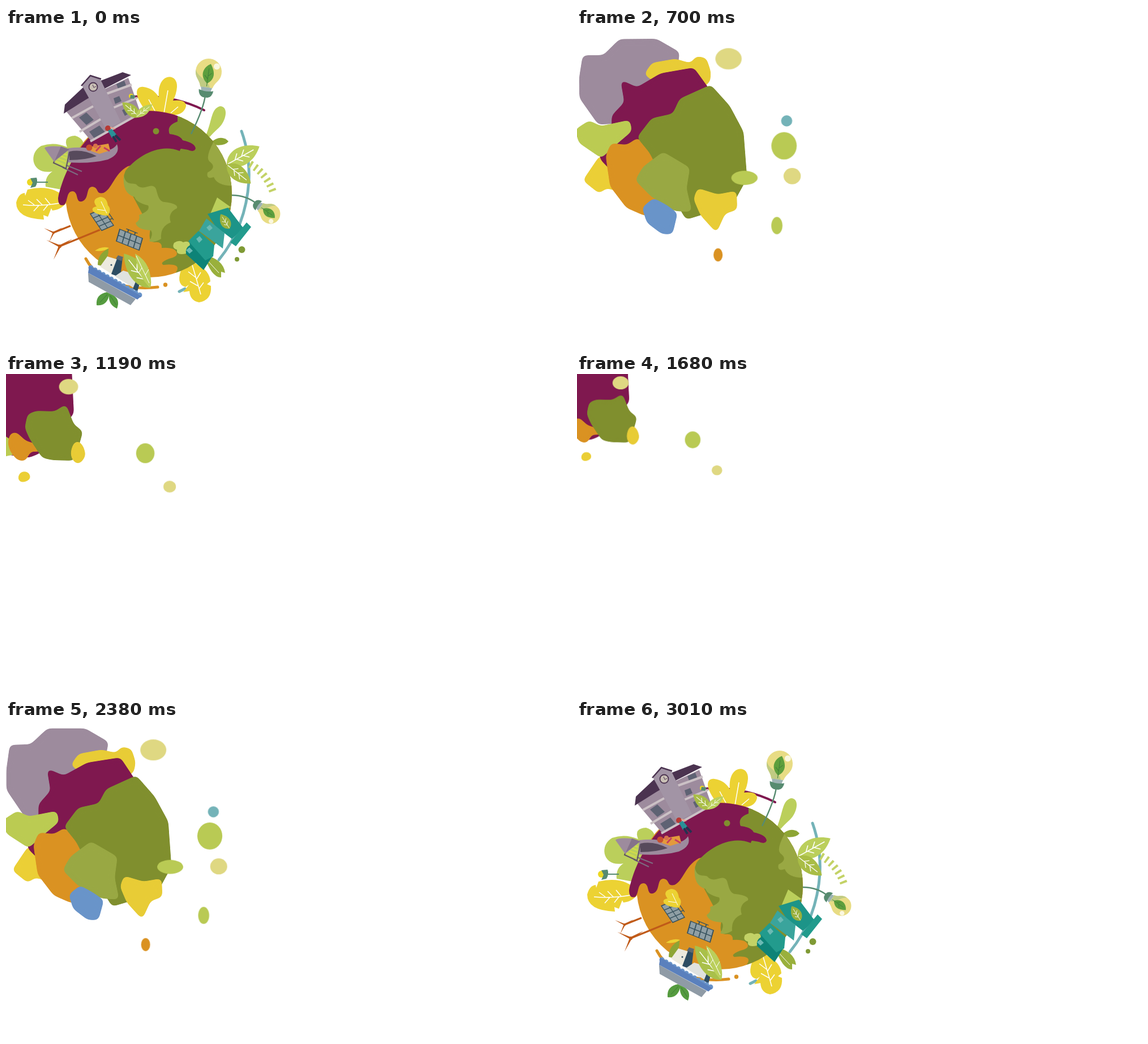
An HTML page without scripts that plays this animation: 998x561 px, repeating every 3.08 s.

```html
<!DOCTYPE html>
<html lang="en">
<head>
<meta charset="utf-8">
<title>Green globe</title>
<style>
html, body { margin: 0; width: 100%; height: 100%; overflow: hidden; background: #fff; }
svg { display: block; width: 998px; height: 561px; }
svg * { animation-duration: 3.08s; animation-iteration-count: infinite; animation-timing-function: step-end; }

/* Large blobs flow between two outlines; drops slide to the corner by the factor --k */
.blob { d: var(--near); filter: url(#goo); animation-name: flow; }
.drop { animation-name: slide; }
.brief { animation-name: brief; }
.late { animation-name: late; }
#blobs { animation-name: blobs; }
#art { animation-name: early, shift; }

@keyframes flow {
  0% { d: var(--near); transform: scale(1.1); animation-timing-function: steps(7); }
  15.909% { d: var(--near); transform: none; animation-timing-function: steps(10); }
  38.636% { d: var(--far); transform: none; animation-timing-function: steps(5); }
  50% { d: var(--far); transform: scale(.8) translate(-20px, -20px); animation-timing-function: steps(6); }
  63.636% { d: var(--far); transform: none; animation-timing-function: steps(9); }
  84.09% { d: var(--near); transform: none; animation-timing-function: steps(6); }
  97.727%, 100% { d: var(--near); transform: scale(1.1); }
}
@keyframes slide {
  0% { transform: translate(calc(var(--x) * 1.1), calc(var(--y) * 1.1)); animation-timing-function: steps(7); }
  15.909% { transform: translate(var(--x), var(--y)); animation-timing-function: steps(10); }
  38.636% { transform: translate(calc(var(--x) * var(--k)), calc(var(--y) * var(--k))) scale(.65); animation-timing-function: steps(5); }
  50% { transform: translate(calc(var(--x) * (var(--k) - .15)), calc(var(--y) * (var(--k) - .15))) scale(.5); animation-timing-function: steps(6); }
  63.636% { transform: translate(calc(var(--x) * var(--k)), calc(var(--y) * var(--k))) scale(.65); animation-timing-function: steps(9); }
  84.09% { transform: translate(var(--x), var(--y)); animation-timing-function: steps(6); }
  97.727%, 100% { transform: translate(calc(var(--x) * 1.1), calc(var(--y) * 1.1)); }
}
@keyframes blobs { 0%, 97.727%, 100% { opacity: 0; } 2.272% { opacity: 1; } }
@keyframes early { 0%, 95.454%, 100% { opacity: 1; } 6.818% { opacity: 0; } }
@keyframes late { 0%, 84.09%, 100% { opacity: 1; } 18.181% { opacity: 0; } }
@keyframes brief { 0%, 68.181%, 100% { opacity: 1; } 31.818% { opacity: 0; } }
@keyframes shift {
  0% { transform: none; animation-timing-function: steps(3); }
  6.818%, 93.181% { transform: scale(.97); animation-timing-function: steps(2); }
  97.727%, 100% { transform: none; }
}

.mauve {
  --near: path("M31 100 40 86 75 94 90 62 145 57 182 78 200 120 128 194 75 162 36 125");
  --far: path("M-60 60 -60 -40 -20 -60 40 -80 130 -70 180 -40 120 -5 0 105 -50 190 -70 120");
}
.plume {
  --near: path("M6 305 45 250 72 248 92 335 60 322 45 335");
  --far: path("M20 185 25 172 40 172 45 185 35 190 25 192");
}
.crown {
  --near: path("M158 100 170 78 218 71 256 99 268 74 290 72 304 102 320 122 317 142 185 125");
  --far: path("M26 40 44 23 71 15 71 -24 77 -8 85 9 79 19 38 32 -28 40 35 33");
}
.purple {
  --near: path("M82 310 58 270 64 244 96 232 96 208 128 187 118 143 143 162 185 123 245 104 287 130 200 240");
  --far: path("M40 148 0 142 -20 100 -20 60 -20 30 -20 0 -20 -30 20 -30 60 -20 116 -10 120 70 60 140");
}
.bush {
  --near: path("M21 200 35 188 60 200 125 178 128 200 95 235 70 264 30 225");
  --far: path("M-60 130 -10 105 0 110 20 125 25 140 0 145 -20 150 -60 150");
}
.orange {
  --near: path("M71 270 83 245 118 251 138 226 172 262 232 392 205 412 155 407 116 388 80 340");
  --far: path("M3 122 7 105 18 102 35 118 63 126 62 138 44 136 34 154 20 152 8 138");
}
.green {
  --near: path("M137 235 172 197 219 188 222 150 292 120 334 158 362 218 374 325 340 382 240 418 195 330 165 265");
  --far: path("M33 95 38 71 53 65 86 66 106 53 120 89 136 101 129 126 120 153 82 152 64 148 42 115");
}
.land {
  --near: path("M126 300 143 279 170 256 223 292 207 325 235 393 212 397 165 345");
  --far: path("M48 195 55 165 110 130 145 140 162 185 130 165 80 150 50 185");
}
.tuft {
  --near: path("M245 372 253 351 300 369 344 355 344 397 316 402 298 448 262 408");
  --far: path("M114 138 119 122 128 117 137 128 141 143 135 154 126 160 116 150");
}
.blue {
  --near: path("M152 395 175 373 205 387 220 405 217 463 200 461 165 435");
  --far: path("M28 134 42 129 50 138 79 143 56 133 33 136 26 130");
}
</style>
</head>
<body>
<svg viewBox="0 0 998 561">
<defs>
  <filter id="goo" x="-.3" y="-.3" width="1.6" height="1.6" color-interpolation-filters="sRGB">
    <feGaussianBlur stdDeviation="5"/>
    <feColorMatrix values="1 0 0 0 0 0 1 0 0 0 0 0 1 0 0 0 0 0 14 -6.5"/>
  </filter>
  <clipPath id="disc"><circle cx="252" cy="293" r="147"/></clipPath>
  <g id="leaf">
    <path d="M0 0C15-30 60-36 100 0C65 32 20 32 0 0"/>
    <path d="M4 0H82M25 0l13-13M45 0l14-13M30 0l13 13M50 0l13 12" fill="none" stroke="#fff" stroke-width="2.4"/>
  </g>
  <g id="bulb">
    <path d="M-23 0a23 23 0 0 1 46 0C23 14 13 17 11 28H-11C-13 17-23 14-23 0" fill="#e8dc84"/>
    <path d="M-23 0C-23 14-13 17-11 28H6C2 14-16 14-23 0" fill="#c0cb83"/>
    <circle cx="13" cy="-11" r="5.5" fill="#faf7df"/>
    <path d="M0 21C-17 8-9-8 2-14C12 0 13 12 0 21" fill="#5d9f3d"/>
    <path d="M0 26V-6M0 8l6-6M0 13l-6-6" stroke="#3f7f3a" fill="none"/>
    <path d="M-10 28H10L8 36H-8z" fill="#9db3b4"/>
    <path d="M-13 33Q0 37 13 33Q12 44 4 46H-4Q-12 44-13 33" fill="#578b70"/>
  </g>
  <g id="panel" stroke="#38535f" stroke-width="1.8">
    <path d="M14 0V-7M26 0V-7M10-7H30"/>
    <path d="M0 0H40V30H0z" fill="#8f9fa5"/>
    <path d="M10 0V30M20 0V30M30 0V30M0 15H40"/>
  </g>
  <path id="blade" d="M-2 0L0-26L2 0z"/>
  <g id="mill" fill="#c05a18">
    <circle r="3"/>
    <use href="#blade" transform="rotate(60)"/>
    <use href="#blade" transform="rotate(-65)"/>
    <use href="#blade" transform="rotate(205)"/>
  </g>
</defs>

<g id="blobs">
  <path class="blob mauve" fill="#9d8b9d"/>
  <path class="blob plume" fill="#ebcf36"/>
  <g class="brief"><path class="blob crown" fill="#e8cc36"/></g>
  <path class="blob purple" fill="#7f184f"/>
  <path class="blob bush" fill="#bbcb52"/>
  <path class="blob orange" fill="#da9222"/>
  <path class="blob green" fill="#808f2e"/>
  <g class="brief"><path class="blob land" fill="#99a843"/></g>
  <g class="late">
    <ellipse class="drop" rx="32" ry="22" fill="#9bae3a" style="--x:374px;--y:241px;--k:.6"/>
    <ellipse class="drop" rx="25" ry="26" fill="#229b8d" style="--x:349px;--y:343px;--k:.5"/>
    <ellipse class="drop" rx="6" ry="10" fill="#74b3b8" style="--x:291px;--y:446px;--k:.7"/>
  </g>
  <path class="blob tuft" fill="#e8cc36"/>
  <path class="blob blue" fill="#6994c9"/>
  <g class="brief">
    <ellipse class="drop" rx="11" ry="11" fill="#74b3b8" style="--x:407px;--y:180px;--k:.7"/>
    <ellipse class="drop" rx="26" ry="14" fill="#b9ca54" style="--x:348px;--y:311px;--k:.5"/>
    <ellipse class="drop" rx="11" ry="17" fill="#b9ca54" style="--x:388px;--y:383px;--k:.7"/>
    <ellipse class="drop" rx="9" ry="13" fill="#da9222" style="--x:272px;--y:437px;--k:.72"/>
  </g>
  <ellipse class="drop" rx="25" ry="27" fill="#b9ca54" style="--x:417px;--y:237px;--k:.59"/>
  <ellipse class="drop" rx="26" ry="21" fill="#dfd882" style="--x:335px;--y:68px;--k:.33"/>
  <ellipse class="drop" rx="17" ry="16" fill="#dfd882" style="--x:419px;--y:288px;--k:.69"/>
</g>

<g id="art">
  <g fill="none" stroke-width="5" stroke-linecap="round">
    <path d="M416 182Q431 224 429 270Q424 350 376 409M306 465L316 460" stroke="#74b3b8"/>
    <path d="M222 121Q295 117 350 145" stroke="#7f184f" stroke-width="4"/>
    <path d="M141 407Q152 428 172 440M205 454Q238 461 268 457" stroke="#da9222"/>
  </g>

  <!-- plants behind the globe -->
  <path d="M70 280Q68 262 82 253C46 260 38 222 62 208Q85 200 108 210Q100 191 122 190Q140 195 138 215L115 255L98 285z" fill="#bbcf5b"/>
  <path d="M18 308Q22 292 33 291L34 296L38 285Q84 274 110 304Q100 320 82 322L80 318L74 333L66 330L67 338Q18 336 18 308" fill="#ecd233"/>
  <path d="M30 312Q65 315 100 308M50 312l-11-8M64 312l-10-10M78 311l-9-11M58 313l-9 10M74 312l-8 10" fill="none" stroke="#fff" stroke-width="1.5"/>
  <path d="M48 272H74" stroke="#578b70" stroke-width="2"/>
  <circle cx="43" cy="272" r="6" fill="#ecd822"/>
  <path d="M43 265L54 264Q57 272 52 280L43 282L47 273z" fill="#578b70"/>
  <path d="M250 150C222 116 230 102 243 104Q260 106 270 122C266 78 304 78 302 104Q301 117 295 128Q318 125 318 138Q314 154 292 154z" fill="#ecd233"/>
  <path d="M279 150L286 110M264 148L252 126M291 150L304 139" stroke="#fff" stroke-width="1.5"/>
  <path d="M353 190C365 160 362 143 378 138C394 138 389 164 376 176Q366 185 360 192z" fill="#bbcf5b"/>
  <path d="M360 203Q380 186 393 200Q386 210 360 205" fill="#8da534"/>
  <path d="M312 420Q298 452 317 457L323 453L313 466L324 464Q325 481 341 484Q364 480 362 455L355 452L361 447Q360 428 335 415z" fill="#ecd233"/>
  <path d="M328 415Q337 445 344 470M335 440l-13-10M339 455l-14-8M336 444l8-13M341 460l8-11" fill="none" stroke="#fff" stroke-width="1.5"/>
  <path d="M350 400Q384 408 387 432L380 430L380 440Q362 440 350 400" fill="#99b03c"/>
  <path d="M354 408L376 432" stroke="#fff"/>
  <path d="M431 240Q460 256 472 290" fill="none" stroke="#c3d266" stroke-width="13" stroke-dasharray="4 6"/>

  <!-- globe -->
  <circle cx="252" cy="293" r="147" fill="#da9222"/>
  <path d="M303 155C270 143 230 144 205 152C145 176 105 240 92 300Q92 316 103 312C110 305 106 288 118 288C129 290 122 308 134 306C148 302 140 280 153 280C165 282 158 294 172 291C188 284 190 258 215 244L270 230L335 214z" fill="#7f184f"/>
  <g clip-path="url(#disc)">
    <path d="M303 140V165Q283 172 289 187Q308 189 312 198Q334 203 335 212Q333 220 322 215Q308 208 307 217C270 202 230 228 211 252Q202 272 218 285L255 355Q250 378 262 378Q276 376 275 388Q300 386 302 398Q302 404 288 407Q270 414 278 418Q314 414 298 434L285 445H420V140z" fill="#808f2e"/>
    <path d="M303 155V167Q285 172 289 187Q308 189 312 198Q334 203 335 212Q333 220 322 215L280 208V150z" fill="#7f184f"/>
    <path d="M303 140V165Q283 172 289 187Q308 189 312 198Q334 203 335 212L380 200V140z" fill="#808f2e"/>
    <path d="M208 260C212 282 228 270 232 278C245 288 255 272 264 282C268 290 268 306 280 307Q305 310 302 318Q285 326 291 343Q272 350 274 372Q260 380 253 376Q261 364 256 357Q232 356 229 344Q238 338 235 330Q256 322 251 313Q230 308 227 298Q205 292 208 260" fill="#99a843"/>
    <path d="M367 200Q352 228 359 235Q374 246 356 255Q353 268 367 263Q374 280 405 278V200z" fill="#99a843"/>
  </g>
  <circle cx="265" cy="182" r="5.5" fill="#808f2e"/>

  <!-- school -->
  <path d="M107 148L140 124L216 88L237 148L151 200z" fill="#9d8b9d"/>
  <path d="M102 151L104 135L136 105L206 78L221 83L176 106L140 127z" fill="#4b3350"/>
  <path d="M129 158l13-9 13 13-13 9zM147 183l18-11 10 12-18 12zM195 99l14-6 4 11-14 6zM190 124l10-4 4 9-11 5zM205 145l15-8 4 10-14 8z" fill="#5e6273"/>
  <path d="M116 159L154 138M130 183L172 158M172 118L222 100M184 143L232 123M149 200L238 150" stroke="#cbc1c5" stroke-width="4"/>
  <path d="M134 101L150 83L167 91L203 166L177 179z" fill="#a294a5"/>
  <path d="M133 102L149 84L168 90" fill="none" stroke="#4b3350" stroke-width="2.5"/>
  <circle cx="154" cy="104" r="7.5" fill="#c9c0b5" stroke="#4b3350" stroke-width="1.8"/>
  <path d="M153 100l2 5 4-2" fill="none" stroke="#4b3350"/>
  <circle cx="221" cy="120" r="4" fill="#ecd822"/>
  <path d="M220 118l9 1-3 6-7-1z" fill="#578b70"/>
  <use href="#leaf" fill="#a9bd46" transform="translate(236 157) rotate(220) scale(.4)"/>
  <use href="#leaf" fill="#bbcf5b" transform="translate(230 157) rotate(-38) scale(.36 .3)"/>

  <!-- playground -->
  <path d="M110 212Q140 208 160 216Q188 219 196 205Q203 222 180 232Q150 240 108 237z" fill="#9d8b9d"/>
  <path d="M112 218Q135 213 160 226Q140 233 112 233z" fill="#574a5c"/>
  <path d="M106 242L134 253M100 246L127 259" stroke="#7c6b80" stroke-width="2"/>
  <circle cx="180" cy="177" r="5" fill="#b73a35"/>
  <path d="M180 181L187 178L196 189L187 194z" fill="#2a9097"/>
  <path d="M189 191L195 201M193 189L202 198" stroke="#243250" stroke-width="4"/>
  <path d="M184 175L193 178" stroke="#e4a28a" stroke-width="2"/>
  <path d="M152 209L181 204L184 216L165 222L150 217z" fill="#e39a3c"/>
  <circle cx="147" cy="211" r="5.5" fill="#c8502f"/>
  <circle cx="158" cy="208" r="4" fill="#d8714c"/>
  <path d="M159 217l8-9M173 211l10 6" stroke="#c63d62" stroke-width="3"/>

  <!-- energy -->
  <use href="#panel" transform="matrix(.5 .73 -.7 .3 170 319)"/>
  <use href="#panel" transform="matrix(1 .4 -.2 .7 201 355)"/>
  <path d="M180 331C150 330 147 316 160 315Q150 302 166 298Q178 298 180 313Q187 320 180 331" fill="#ecd233"/>
  <path d="M178 327L168 306M175 322l-14-2" stroke="#fff"/>
  <path d="M327 187Q350 140 352 118M399 295Q425 295 444 311" fill="none" stroke="#578b70" stroke-width="2.5"/>
  <use href="#bulb" transform="translate(358 77) rotate(8)"/>
  <use href="#bulb" transform="translate(467 328) rotate(125) scale(.76)"/>
  <use href="#leaf" fill="#bbcf5b" transform="translate(390 241) rotate(-29) scale(.66)"/>
  <use href="#leaf" fill="#a9bd46" transform="translate(390 241) rotate(38) scale(.54)"/>

  <!-- factory -->
  <path d="M360 330L373 299L397 316z" fill="#bbcf5b"/>
  <path d="M315 396L327 376L355 398L365 402L349 427z" fill="#0d8377"/>
  <path d="M356 328L392 317L420 354L399 372L370 350z" fill="#1c9488"/>
  <path d="M322 376L340 358L368 383L366 403L352 410z" fill="#229b8d"/>
  <path d="M341 358L354 336L386 362L383 389z" fill="#3aa49c"/>
  <path d="M396 378L425 343L433 351L406 385z" fill="#229b8d"/>
  <path d="M336 372l6-5 5 6-6 6zM354 352l6-5 5 6-6 5zM318 392l6-5 6 6-6 5z" fill="#6bbab4"/>
  <use href="#leaf" fill="#99b03c" transform="translate(395 354) rotate(238) scale(.3 .36)"/>
  <path d="M318 398Q300 402 302 391Q292 388 297 379Q306 373 313 378Q324 374 325 383Q316 388 318 398" fill="#c3d266"/>
  <circle cx="416.500" cy="391" r="6" fill="#7f9a35"/>
  <circle cx="408" cy="408" r="4" fill="#7f9a35"/>
  <circle cx="281.500" cy="453" r="3.700" fill="#da9222"/>

  <!-- ship -->
  <path d="M157 393Q170 384 182 388Q174 395 157 393" fill="#ecd233"/>
  <path d="M162 418Q162 398 181 389Q182 404 170 420z" fill="#8da534"/>
  <path d="M166 421L179 403L199 409L190 436z" fill="#eceade"/>
  <path d="M186 434L198 402L206 405L202 440z" fill="#2d4d63"/>
  <path d="M194 407l4-6 9 3-3 7z" fill="#5c6872"/>
  <path d="M192 438L207 428L234 436L228 460z" fill="#dfe2df"/>
  <path d="M224 460L232 440L238 444L232 465z" fill="#2d4d63"/>
  <circle cx="186" cy="418" r="1.500" fill="#2d4d63"/>
  <path d="M150 423L236 471" stroke="#6994c9" stroke-width="9" stroke-dasharray="0 8.200" stroke-linecap="round"/>
  <path d="M147 419L239 473L232 479L145 432z" fill="#5a80bd"/>
  <path d="M145 432L229 478L220 489L146 448z" fill="#8f9ba6"/>
  <use href="#leaf" fill="#a9c04a" transform="translate(255 458) rotate(232) scale(.76 .64)"/>
  <path d="M228 398Q260 416 255 458Q234 442 228 398" fill="#bbcf5b"/>
  <path d="M230 402L253 450M240 423l-5 8M246 436l6-10" stroke="#fff"/>
  <path d="M178 466Q158 470 160 489Q177 491 182 473Q181 488 196 495Q203 477 186 470z" fill="#559b3f"/>
  <path d="M179 470L166 484M184 472L195 489" stroke="#3d7c37"/>
</g>

<g class="late">
  <path d="M166 356L95 385M114 349L84 361" stroke="#c05a18" stroke-width="3"/>
  <use href="#mill" transform="translate(95 385)"/>
  <use href="#mill" transform="translate(84 361) scale(.72)"/>
  <path d="M92 215L84 238L106 248L112 219" fill="none" stroke="#5f5163" stroke-width="2"/>
  <path d="M94 219l14 5M92 224l15 6M90 230l16 6M88 235l16 7" stroke="#d4dd49" stroke-width="2"/>
  <path d="M68 212Q70 207 98 209L112 214L85 236z" fill="#9d8b9d"/>
  <path d="M86 234L97 209L112 214z" fill="#85738a"/>
</g>
</svg>
</body>
</html>
```
